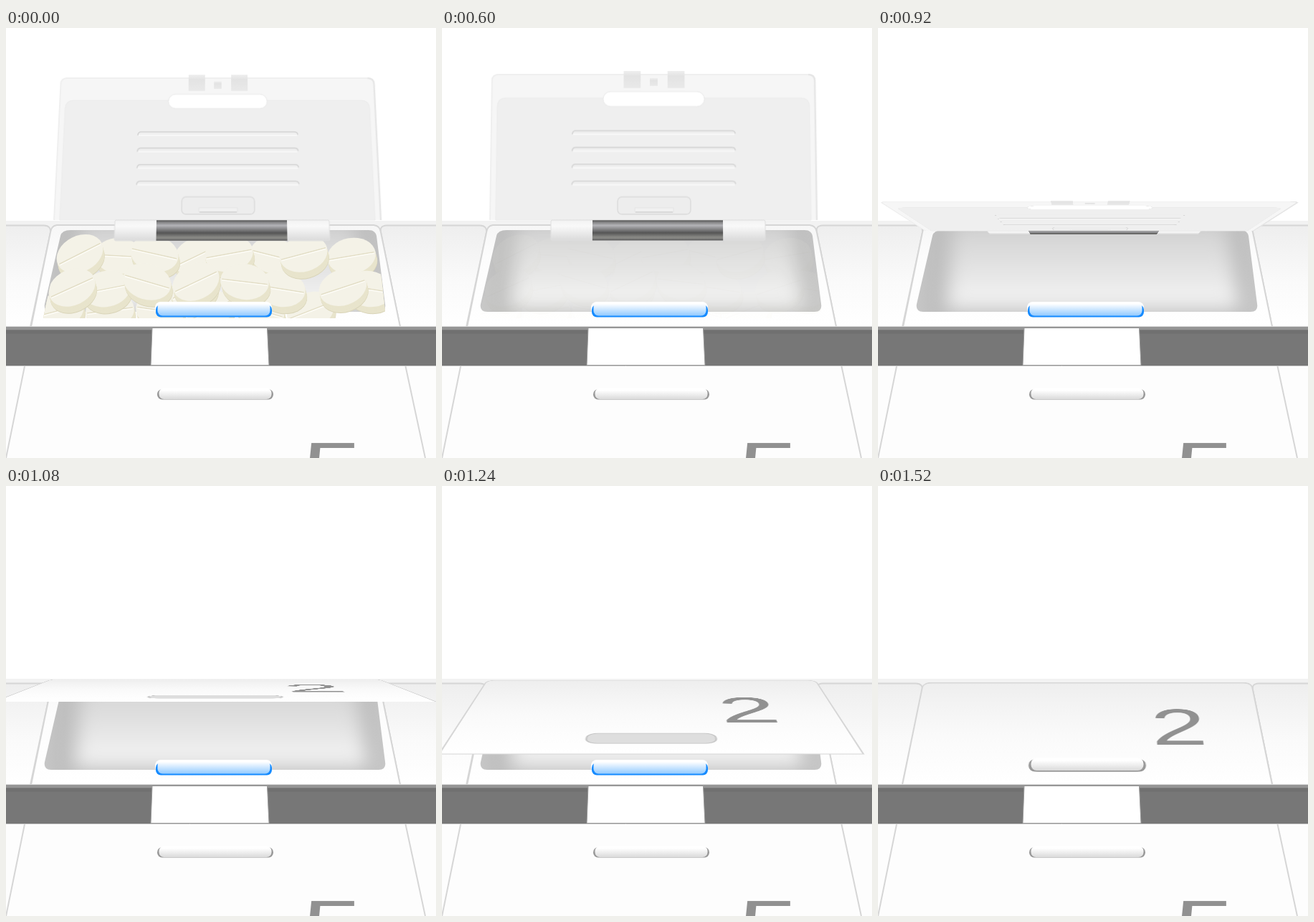
Write an HTML page that moves like this. It is 600 by 600 pixels and loops after 1.92 s.

```html
<!DOCTYPE html>
<html lang="en">
<head>
<meta charset="utf-8">
<title>Pill box</title>
<style>
  html, body { margin: 0; width: 100%; height: 100%; overflow: hidden; background: #fff; }
  #stage { position: relative; width: 600px; height: 600px; overflow: hidden; }
  svg { position: absolute; left: 0; top: 0; }
  .lid { width: 1px; height: 1px; overflow: visible; transform-origin: 0 0; }
  text { font-family: "Liberation Sans", Arial, sans-serif; fill: #919191; }
</style>
</head>
<body>
<div id="stage">
  <svg width="600" height="600" viewBox="0 0 600 600">
    <defs>
      <linearGradient id="cover" x2="0" y2="1"><stop stop-color="#eee"/><stop offset=".55" stop-color="#fafafa"/><stop offset="1" stop-color="#fff"/></linearGradient>
      <linearGradient id="plate" x2="0" y2="1"><stop stop-color="#f6f6f6"/><stop offset=".3" stop-color="#fcfcfc"/><stop offset="1" stop-color="#fff"/></linearGradient>
      <linearGradient id="well"><stop stop-color="#c6c6c6"/><stop offset=".06" stop-color="#bebebe"/><stop offset=".94" stop-color="#bebebe"/><stop offset="1" stop-color="#c6c6c6"/></linearGradient>
      <linearGradient id="glow" x2="0" y2="1"><stop stop-color="#d0d0d0"/><stop offset=".5" stop-color="#e2e2e2"/><stop offset="1" stop-color="#f6f6f6"/></linearGradient>
      <linearGradient id="knob" x2="0" y2="1"><stop offset=".2" stop-color="#fff"/><stop offset="1" stop-color="#dadada"/></linearGradient>
      <linearGradient id="blue" x2="0" y2="1"><stop offset=".15" stop-color="#fff"/><stop offset="1" stop-color="#92caff"/></linearGradient>
      <linearGradient id="steel" x2="0" y2="1"><stop stop-color="#666"/><stop offset=".25" stop-color="#b4b4b8"/><stop offset=".62" stop-color="#555"/><stop offset=".85" stop-color="#8c8c88"/><stop offset="1" stop-color="#666"/></linearGradient>
      <linearGradient id="sleeve" x2="0" y2="1"><stop stop-color="#f2f2f2"/><stop offset=".3" stop-color="#f9f9f9"/><stop offset="1" stop-color="#dadada"/></linearGradient>
      <linearGradient id="tab" x2="0" y2="1"><stop stop-color="#eee"/><stop offset=".3" stop-color="#e3e3e3"/><stop offset="1" stop-color="#e9e9e9"/></linearGradient>
      <filter id="soft" x="-20%" y="-40%" width="140%" height="180%"><feGaussianBlur stdDeviation="13"/></filter>
      <path id="tray" d="M90 282H506Q515 282 517 290L529 385Q531 396 520 396H63Q52 396 54 385L76 290Q78 282 90 282Z"/>
      <clipPath id="trayClip"><use href="#tray"/></clipPath>
      <clipPath id="pillClip"><path d="M78 280H516L530 405H52Z"/></clipPath>
    </defs>

    <!-- body and neighbouring lids -->
    <rect y="269" width="600" height="150" fill="#f2f2f2"/>
    <g fill="url(#cover)" stroke="#d6d6d6" stroke-width="2">
      <path d="M-9 275.500H53Q63 276 62 285L34 417H-9Z"/>
      <path d="M609 275.500H531Q521 276 523 285L550 417H609Z"/>
    </g>
    <path d="M71 275H513Q522 276 523 285L550 417H35L62 285Q63 276 71 275Z" fill="url(#plate)" stroke="#d6d6d6" stroke-width="2"/>
    <use href="#tray" fill="url(#well)"/>
    <g clip-path="url(#trayClip)"><path d="M106 272H484L505 392H96Z" fill="url(#glow)" filter="url(#soft)"/></g>
    <g id="pills" clip-path="url(#pillClip)"></g>

    <rect x="208" y="382" width="163" height="18" rx="8" fill="#fff"/>
    <rect x="209" y="386" width="162" height="17.500" rx="7" fill="#168bff"/>
    <rect x="211.500" y="382" width="157" height="19.500" rx="7" fill="url(#blue)"/>

    <!-- front band and next row -->
    <rect y="417" width="600" height="54" fill="#777"/>
    <rect y="417" width="600" height="4.500" fill="#959595"/>
    <rect y="421.500" width="600" height="5" fill="#707070"/>
    <rect y="471" width="600" height="129" fill="#fdfdfd"/>
    <path d="M0 471.500H600" stroke="#c4c4c4"/>
    <path d="M204 418.500H364.500L367 470.500H202Z" fill="#fff" stroke="#999"/>
    <path d="M26 472L0 600M557.500 472L585 600" stroke="#d6d6d6" stroke-width="2"/>
    <rect x="211" y="504" width="162" height="14.500" rx="7" fill="#999"/>
    <rect x="213.500" y="502.500" width="157" height="15.500" rx="7" fill="url(#knob)"/>
    <text transform="translate(413.500 643) scale(1.66 1)" font-size="92">5</text>
  </svg>

  <svg class="lid" id="inside">
    <path d="M-229 0V-194Q-229-204-219-204H219Q229-204 229-194V0Z" fill="#f6f6f6"/>
    <path d="M-228 0V-194Q-228-203-219-203H219" fill="none" stroke="#efefef" stroke-width="2"/>
    <path d="M219-203Q228-203 228-194V0" fill="none" stroke="#e6e6e6" stroke-width="2.500"/>
    <path d="M-220 0V-158Q-220-170-208-170H208Q220-170 220-158V0Z" fill="#efefef" stroke="#ebebeb"/>
    <rect x="-71" y="-179" width="143" height="21" rx="10.500" fill="#fff" stroke="#e8e8e8"/>
    <g fill="url(#tab)">
      <rect x="-42" y="-208" width="24" height="24"/>
      <rect x="20" y="-208" width="24" height="24"/>
      <rect x="-5" y="-198" width="11" height="11"/>
    </g>
    <g id="ribs" fill="none"></g>
    <rect x="-50" y="-32" width="102" height="24" rx="6" fill="#ededed" stroke="#dcdcdc" stroke-width="1.500"/>
    <path d="M-26-11V-17H28V-11Z" fill="#f1f1f1" stroke="#e4e4e4"/>
    <path d="M-25-11H27" stroke="#d2d2d2" stroke-width="1.500"/>
    <rect x="-143" width="299" height="28" rx="2" fill="url(#sleeve)" stroke="#dedede"/>
    <rect x="-85" y=".5" width="182" height="27.500" fill="url(#steel)"/>
    <path d="M-85 1H97M-85 27.500H97" stroke="#555"/>
  </svg>

  <svg class="lid" id="outside">
    <path d="M-229 258V14Q-229 0-217 0H217Q229 0 229 14V258Z" fill="url(#cover)" stroke="#d6d6d6" stroke-width="2"/>
    <rect x="-73.500" y="198" width="147" height="30" rx="13" fill="#dedede" stroke="#c6c6c6" stroke-width="2"/>
    <text x="84" y="164" font-size="132">2</text>
  </svg>

  <svg id="grip" width="600" height="600" viewBox="0 0 600 600">
    <rect x="210.500" y="381.500" width="163" height="17" rx="8" fill="#999"/>
    <rect x="213.500" y="379.500" width="157" height="17.500" rx="8" fill="url(#knob)"/>
  </svg>
</div>

<script>
const $ = id => document.getElementById(id);
const LOOP = 1920, STEP = 40, HALF = 229;

function tablet(x, y) {
  const tilt = 22 * Math.cos((x - 190) / 170 * 2 * Math.PI) - 5;
  const disc = (dy, fill) =>
    `<ellipse rx="34" ry="25" fill="${fill}" transform="translate(${x + dy / 4} ${y + dy}) rotate(${tilt})"/>`;
  return disc(10, '#d9d4b8') + [9, 6, 3].map(dy => disc(dy, '#e8e4cc')).join('') + disc(0, '#f4f2e7') +
    `<g transform="translate(${x} ${y}) rotate(${tilt})" stroke-width="1.5">
      <path d="M-32 0H32" stroke="#e2ddc5"/><path d="M-32 1.500H32" stroke="#fdfcf6"/></g>`;
}

const row = (y, x, gap, count) =>
  Array.from({ length: count }, (_, i) => tablet(x + i * gap, y)).join('');

// back to front
$('pills').innerHTML = row(394, 75, 70, 6) + row(318, 158, 108, 4) + row(364, 140, 122, 4) +
  row(315, 103, 104, 4) + row(354, 197, 68, 3) + row(362, 92, 378, 2);

$('ribs').innerHTML = [0, 1, 2, 3].map(i => {
  const y = -119 + i * 23.4;
  return `<path d="M-113 ${y}H114" stroke="#f8f8f8" stroke-width="2"/>
    <path d="M-114 ${y}q0-5 5-5h219q5 0 5 4" stroke="#d4d4d4" stroke-width="1.6"/>`;
}).join('');

// time, height and half width of the free edge
const poses = [
  [320, 69, 219], [600, 64, 226], [680, 64, 244], [760, 95, 267],
  [920, 242, 294], [1080, 301, 308], [1240, 374, 296], [1520, 416.5, 258]
];

function slope(i, k) {
  const a = poses[i - 1], b = poses[i + 1];
  return a && b ? (b[k] - a[k]) / (b[0] - a[0]) : 0;
}

// smooth curve through the poses
function poseAt(time) {
  const t = Math.min(Math.max(time, 320), 1520);
  const i = Math.max(0, poses.findIndex(p => p[0] >= t) - 1);
  const a = poses[i], b = poses[i + 1], span = b[0] - a[0], u = (t - a[0]) / span;
  return [1, 2].map(k =>
    a[k] + (b[k] - a[k]) * u * u * (3 - 2 * u) +
    span * u * (1 - u) * (slope(i, k) * (1 - u) - slope(i + 1, k) * u));
}

// perspective map of a flat lid: hinge at y = 0, free edge at y = depth
function project(el, depth, cx, hinge, edge, half) {
  const q = HALF / half;
  const m = [1, 0, 0, 0,
    cx * (q - 1) / depth, (edge * q - hinge) / depth, 0, (q - 1) / depth,
    0, 0, 1, 0, cx, hinge, 0, 1];
  el.style.transform = `matrix3d(${m.map(n => n.toFixed(8))})`;
}

function draw(now) {
  const t = Math.floor((now % LOOP) / STEP) * STEP;
  const [edge, half] = poseAt(t), open = edge < 275;
  $('inside').style.display = open ? '' : 'none';
  $('outside').style.display = open ? 'none' : '';
  if (open) project($('inside'), -204, 295, 268 + Math.max(0, half - 226) ** 2 / 300, edge, half);
  else project($('outside'), 258, 292, 275 - (half - 258) / 10, edge, half);
  $('pills').style.opacity = Math.min(1, Math.max(0, (620 - t) / 300));
  $('grip').style.display = t >= 1480 ? '' : 'none';
}

const start = performance.now();
function tick() {
  draw(performance.now() - start);
  requestAnimationFrame(tick);
}
tick();
</script>
</body>
</html>
```
